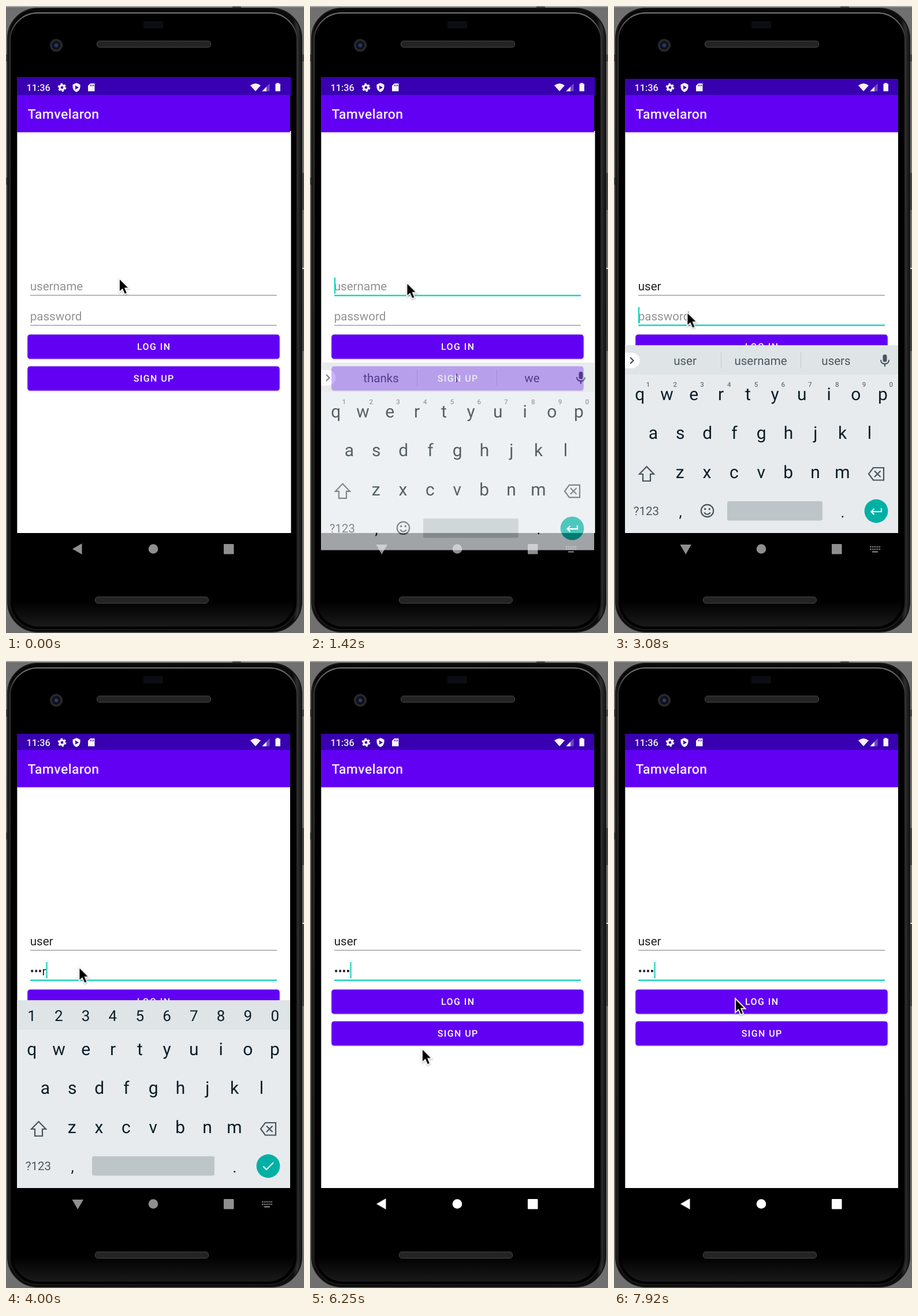
An HTML page for the animation above (8 s loop, 516 by 1085 pixels).

```html
<!DOCTYPE html>
<html lang="en">
<head>
<meta charset="utf-8">
<title>Phone login</title>
<style>
html, body { margin: 0; width: 100%; height: 100%; overflow: hidden; background: #717070; }
svg { display: block; width: 516px; height: 1085px; font-family: Roboto, Arial, sans-serif; text-rendering: geometricPrecision; }
.field { font-size: 20.6px; }
.hint { fill: #939393; }
.typed { fill: #222; }
.btn { fill: #6200f4; filter: drop-shadow(0 1.5px 1px #0004); }
.label { fill: #fff; font-size: 16px; font-weight: 500; letter-spacing: 1.43px; text-anchor: middle; }
.key { font-size: 30px; fill: #0c1d26; text-anchor: middle; }
.num { font-size: 26px; }
.sup { font-size: 11.5px; font-weight: 500; fill: #68737a; }
.word { font-size: 20.5px; fill: #4c585f; text-anchor: middle; }
.icon { fill: none; stroke: #47545c; stroke-width: 2.2; }
.icon.lit { stroke: #fff; }

/* one loop is 8 s, so 1% is 80 ms */
.step { animation: 8s step-end infinite; }
.slide { animation: 8s linear infinite; }

.early { animation-name: early; }
@keyframes early { 0% { visibility: visible } 18.75% { visibility: hidden } }
.focus-user { animation-name: focus-user; }
@keyframes focus-user { 0% { visibility: hidden } 14.625% { visibility: visible } 38.5% { visibility: hidden } }
.focus-pass { animation-name: focus-pass; }
@keyframes focus-pass { 0% { visibility: hidden } 38.5% { visibility: visible } }

.hint-user { animation-name: hint-user; }
@keyframes hint-user { 0% { visibility: visible } 20.875% { visibility: hidden } }
.u1 { animation-name: u1; }
@keyframes u1 { 0% { visibility: hidden } 20.875% { visibility: visible } 22.875% { visibility: hidden } }
.u2 { animation-name: u2; }
@keyframes u2 { 0% { visibility: hidden } 22.875% { visibility: visible } 24% { visibility: hidden } }
.u3 { animation-name: u3; }
@keyframes u3 { 0% { visibility: hidden } 24% { visibility: visible } 26% { visibility: hidden } }
.u4 { animation-name: u4; }
@keyframes u4 { 0% { visibility: hidden } 26% { visibility: visible } }
.compose { animation-name: compose; }
@keyframes compose {
  0% { visibility: hidden; transform: scaleX(.28) }
  20.875% { visibility: visible; transform: scaleX(.28) }
  22.875% { visibility: visible; transform: scaleX(.55) }
  24% { visibility: visible; transform: scaleX(.82) }
  26% { visibility: visible; transform: none }
  38.5% { visibility: hidden }
}

.hint-pass { animation-name: hint-pass; }
@keyframes hint-pass { 0% { visibility: visible } 41.625% { visibility: hidden } }
.p1 { animation-name: p1; }
@keyframes p1 { 0% { visibility: hidden } 41.625% { visibility: visible } 43.75% { visibility: hidden } }
.p2 { animation-name: p2; }
@keyframes p2 { 0% { visibility: hidden } 43.75% { visibility: visible } 45.875% { visibility: hidden } }
.p3 { animation-name: p3; }
@keyframes p3 { 0% { visibility: hidden } 45.875% { visibility: visible } 47.875% { visibility: hidden } }
.p4 { animation-name: p4; }
@keyframes p4 { 0% { visibility: hidden } 47.875% { visibility: visible } 66.6% { visibility: hidden } }
.p5 { animation-name: p5; }
@keyframes p5 { 0% { visibility: hidden } 66.6% { visibility: visible } }

.caret { animation-name: caret; }
@keyframes caret {
  0% { opacity: 0; transform: translate(43px, 470px) }
  14.625% { opacity: 1; transform: translate(43px, 470px) }
  20.875% { opacity: 1; transform: translate(54px, 470px) }
  22.875% { opacity: 1; transform: translate(64.5px, 470px) }
  24% { opacity: 1; transform: translate(75.5px, 470px) }
  26% { opacity: 1; transform: translate(82.5px, 470px) }
  32.25% { opacity: 0; transform: translate(82.5px, 470px) }
  38.5% { opacity: 1; transform: translate(43px, 521px) }
  41.625% { opacity: 1; transform: translate(54px, 521px) }
  43.75% { opacity: 1; transform: translate(60px, 521px) }
  45.875% { opacity: 1; transform: translate(67px, 521px) }
  47.875% { opacity: 1; transform: translate(70.5px, 521px) }
  54.125% { opacity: 0; transform: translate(70.5px, 521px) }
  60.375% { opacity: 1; transform: translate(70.5px, 521px) }
  66.6% { opacity: 0; transform: translate(70.5px, 521px) }
  72.875% { opacity: 1; transform: translate(70.5px, 521px) }
  79.125% { opacity: 0; transform: translate(70.5px, 521px) }
  85.375% { opacity: 1; transform: translate(70.5px, 521px) }
  91.625% { opacity: 0; transform: translate(70.5px, 521px) }
  97.8% { opacity: 1; transform: translate(70.5px, 521px) }
}

.board { animation-name: board; }
@keyframes board {
  0%, 16.25% { opacity: 0; transform: translateY(75px) }
  17.75% { opacity: .7; transform: translateY(30px) }
  19.75%, 70.875% { opacity: 1; transform: none }
  73%, 100% { opacity: 0; transform: translateY(75px) }
}
.words1 { animation-name: words1; }
@keyframes words1 { 0% { visibility: visible } 22.875% { visibility: hidden } }
.words2 { animation-name: words2; }
@keyframes words2 { 0% { visibility: hidden } 22.875% { visibility: visible } 39.625% { visibility: hidden } }
.mode1 { animation-name: mode1; }
@keyframes mode1 { 0% { visibility: visible } 39.625% { visibility: hidden } }
.mode2 { animation-name: mode2; }
@keyframes mode2 { 0% { visibility: hidden } 39.625% { visibility: visible } }

.nav { animation-name: nav; }
@keyframes nav { 0%, 70.875% { fill: #8f8f8f } 73%, 100% { fill: #fff } }
.back { animation-name: back; }
@keyframes back { 0% { visibility: visible } 16.25% { visibility: hidden } 70.875% { visibility: visible } }
.down { animation-name: down; }
@keyframes down { 0% { visibility: hidden } 16.25% { visibility: visible } 70.875% { visibility: hidden } }

.mouse { animation-name: mouse; animation-timing-function: ease-in-out; }
@keyframes mouse {
  0%, 4.125% { transform: translate(196px, 471px) }
  12.5%, 21% { transform: translate(167.5px, 478.5px) }
  27.125%, 30% { transform: translate(161px, 501.5px) }
  36.5%, 58.5% { transform: translate(126.5px, 529.5px) }
  66.6% { transform: translate(105.5px, 911.5px) }
  68.5%, 70.25% { transform: translate(118px, 942px) }
  78.125%, 81% { transform: translate(194px, 670.5px) }
  94%, 100% { transform: translate(210px, 584px) }
}
</style>
</head>
<body>
<svg viewBox="0 0 516 1085">
  <defs>
    <linearGradient id="rim" x2="1" y2="0">
      <stop offset="0" stop-color="#2a2a2a"/><stop offset=".012" stop-color="#080808"/>
      <stop offset=".97" stop-color="#0b0b0b"/><stop offset=".985" stop-color="#303030"/>
      <stop offset="1" stop-color="#111"/>
    </linearGradient>
    <linearGradient id="shine" x2="0" y2="1">
      <stop offset="0" stop-color="#767878"/><stop offset=".035" stop-color="#333"/>
      <stop offset=".5" stop-color="#242424"/><stop offset="1" stop-color="#1a1a1a"/>
    </linearGradient>
    <linearGradient id="foot" x2="0" y2="1">
      <stop offset="0" stop-color="#000"/><stop offset="1" stop-color="#1b1b1b"/>
    </linearGradient>
    <pattern id="mesh" width="3" height="3" patternUnits="userSpaceOnUse">
      <rect width="3" height="3" fill="#2b2b2b"/><path d="M0 3 3 0" stroke="#151515"/>
    </pattern>
    <clipPath id="face"><rect x="11" y="14" width="488" height="1060" rx="46"/></clipPath>
    <mask id="dots" maskUnits="userSpaceOnUse" x="440" y="930" width="24" height="18">
      <path d="M443 938H461" stroke="#fff" stroke-width="10" stroke-dasharray="2 1.2"/>
    </mask>
  </defs>

  <!-- phone -->
  <rect width="516" height="1085" fill="#717070"/>
  <path d="M0 1H516" stroke="#b2b2b2" stroke-width="1.5"/>
  <path d="M392 1H407V8H392ZM0 84H4V96H0ZM0 297H4V309H0ZM510 84H516V96H510ZM512 289H516V353H512ZM511 455H516V597H511Z" fill="#484848"/>
  <path d="M513 454H516" stroke="#ddd" stroke-width="2"/>
  <rect x="3" y="4" width="509" height="1079" rx="52" fill="url(#rim)" stroke="#171717" stroke-width="2"/>
  <rect x="7" y="12" width="497" height="1067" rx="48" fill="#000" stroke="url(#shine)" stroke-width="2"/>
  <g clip-path="url(#face)"><rect x="11" y="1030" width="488" height="46" fill="url(#foot)"/></g>
  <rect x="238" y="26" width="34" height="13" rx="3" fill="#0c0c13"/>
  <circle cx="87" cy="68" r="11" fill="#29292b"/>
  <circle cx="87" cy="68" r="7.5" fill="#0d111c"/>
  <circle cx="87" cy="68" r="3.2" fill="#263a6c"/>
  <g fill="url(#mesh)" stroke="#454545">
    <rect x="157.5" y="60.5" width="197" height="11" rx="4.5"/>
    <rect x="154.5" y="1022.5" width="196" height="11" rx="4.5"/>
  </g>

  <!-- app -->
  <g class="step early">
    <path d="M19 123H493.5V154H19Z" fill="#3900b1"/>
    <path d="M491 216H493.5V912H491Z" fill="#fff"/>
  </g>
  <path d="M19.3 218H492V912H19.3Z" fill="#fff"/>
  <path d="M19 126H492V154H19Z" fill="#3900b1"/>
  <path d="M19 154H492V218.5H19Z" fill="#6200f4"/>
  <text x="35.5" y="146.5" font-size="16.3" font-weight="500" fill="#f4efff">11:36</text>
  <g fill="#f7f3ff">
    <circle cx="97" cy="141" r="4" fill="none" stroke="#f7f3ff" stroke-width="3.4"/>
    <circle cx="97" cy="141" r="6.3" fill="none" stroke="#f7f3ff" stroke-width="2.2" stroke-dasharray="3.3"/>
    <path d="M122 133 128.5 136V140.5Q128 146.5 122 149 116 146.5 115.5 140.5V136Z"/>
    <path d="M120 137.5 126 141 120 144.5Z" fill="#3900b1"/>
    <path d="M146 134H153.500V147.500H142V138Z"/>
    <path d="M146.500 136V139M149 136V139M151.500 136V139" stroke="#3900b1"/>
    <path d="M423 137.500Q432 130.500 441 137.500L432 147.500Z"/>
    <path d="M456.500 134V147.500H443.500Z" opacity=".3"/>
    <path d="M451 139.700V147.500H443.500Z"/>
    <path d="M468.500 133H472.500V134.500H475V147.500H466.500V134.500H468.500Z"/>
  </g>
  <text x="37.5" y="195" font-size="23" font-weight="500" letter-spacing=".4" fill="#f6f0ff">Tamvelaron</text>

  <path d="M42 500.5H469M42 552.5H469" stroke="#7c7c7c"/>
  <g stroke="#1dd3bd" stroke-width="2.3">
    <path class="step focus-user" d="M42 501H469"/>
    <path class="step focus-pass" d="M42 552.5H469"/>
  </g>
  <g class="field">
    <text class="hint step hint-user" x="41.7" y="492">username</text>
    <text class="hint step hint-pass" x="41.7" y="544">password</text>
    <g class="typed">
      <text class="step u1" x="41.7" y="492">u</text>
      <text class="step u2" x="41.7" y="492">us</text>
      <text class="step u3" x="41.7" y="492">use</text>
      <text class="step u4" x="41.7" y="492">user</text>
      <text class="step p1" x="41.7" y="544">u</text>
      <text class="step p2" x="41.7" y="544">•s</text>
      <text class="step p3" x="41.7" y="544">••e</text>
      <text class="step p4" x="41.7" y="544">•••r</text>
      <text class="step p5" x="41.7" y="544">••••</text>
    </g>
  </g>
  <g transform="translate(42 494.5)"><path class="step compose" d="M0 0H40" stroke="#333" stroke-width="1.3"/></g>
  <rect class="step caret" x="-1.2" width="2.4" height="28" fill="#1dd3bd"/>

  <rect class="btn" x="37.3" y="568.5" width="436.4" height="42" rx="4.5"/>
  <rect class="btn" x="37.3" y="623.5" width="436.4" height="42" rx="4.5"/>
  <text class="label" x="256.2" y="595.3">LOG IN</text>
  <text class="label" x="256.2" y="650.3">SIGN UP</text>

  <!-- navigation bar -->
  <g class="slide nav">
    <path class="step back" d="M115 939.5 131.5 930V949Z"/>
    <path class="step down" d="M114.5 932H134L124.2 949Z"/>
    <circle cx="255" cy="939.5" r="8.3"/>
    <rect x="377" y="931" width="17.5" height="17.5" rx="1"/>
    <g class="step down">
      <path d="M443 935H461V937H443ZM443 939H461V941H443Z" mask="url(#dots)"/>
      <path d="M447 943.5H457V945.5H447Z"/>
    </g>
  </g>

  <!-- keyboard -->
  <g class="slide board">
    <path d="M19 587H492V912H19Z" fill="#e7ebee"/>
    <path d="M19 587H492V638H19Z" fill="#dfe4e7"/>
    <text class="key" y="682" data-from="44.8" data-gap="46.75">qwertyuiop</text>
    <text class="key" y="749" data-from="68" data-gap="46.8">asdfghjkl</text>
    <text class="key" y="817" data-from="114.2" data-gap="46.85">zxcvbnm</text>
    <text class="word" x="56" y="881">?123</text>
    <text class="key num" x="115" y="884">,</text>
    <text class="key num" x="396" y="884.5">.</text>
    <path class="icon" d="M56.5 797 69 810H63V822H50V810H44Z"/>
    <path class="icon" d="M449 799H467V820.5H449L441 809.7ZM451 804.5 461.5 815M461.5 804.5 451 815"/>
    <circle cx="454" cy="874" r="20.4" fill="#00b0a4"/>

    <g class="step mode1">
      <text class="key sup" y="659" data-from="59" data-gap="46.75">1234567890</text>
      <path d="M185.5 599V627M323.5 599V627" stroke="#c3cacd"/>
      <path d="M19 600H31A13.5 13.5 0 0 1 31 627H19Z" fill="#fff"/>
      <path class="icon" d="M28 608 33.5 613.5 28 619"/>
      <rect x="465.5" y="603" width="7" height="13" rx="3.5" fill="#47545c"/>
      <path class="icon" d="M462 612.5C462 621.5 476 621.5 476 612.5M469 619.5V624"/>
      <g class="word step words1"><text x="123" y="621">thanks</text><text x="254" y="621">I</text><text x="384.5" y="621">we</text></g>
      <g class="word step words2"><text x="123" y="621">user</text><text x="254" y="621">username</text><text x="384.5" y="621">users</text></g>
      <circle class="icon" cx="161.5" cy="873.5" r="10.7"/>
      <g fill="#47545c"><circle cx="157.7" cy="870.5" r="1.7"/><circle cx="165.3" cy="870.5" r="1.7"/></g>
      <path class="icon" d="M156 876.5Q161.5 883 167 876.5"/>
      <rect x="196" y="857" width="165" height="33.5" rx="3" fill="#bdc5c8"/>
      <path class="icon lit" d="M463 869V875H446M450.5 870 445.5 875 450.5 880"/>
    </g>
    <g class="step mode2">
      <text class="key num" y="622.5" data-from="44.5" data-gap="46.8">1234567890</text>
      <rect x="149" y="857" width="212" height="33.5" rx="3" fill="#bdc5c8"/>
      <path class="icon lit" d="M445.5 874.5 451 880 463 868"/>
    </g>
  </g>

  <g class="slide mouse">
    <path d="M0 0V24.500L5.500 19.300 9.300 28 14 26 10.300 17.500H17.500Z" fill="#000" stroke="#fff" stroke-width="1.800" style="filter:drop-shadow(0 1.500px 1px #0005)"/>
  </g>
</svg>
<script>
// space the keys of each row evenly
for (const row of document.querySelectorAll('[data-gap]')) {
  const { from, gap } = row.dataset;
  row.setAttribute('x', [...row.textContent].map((_, i) => +from + i * gap).join(' '));
}
</script>
</body>
</html>
```
